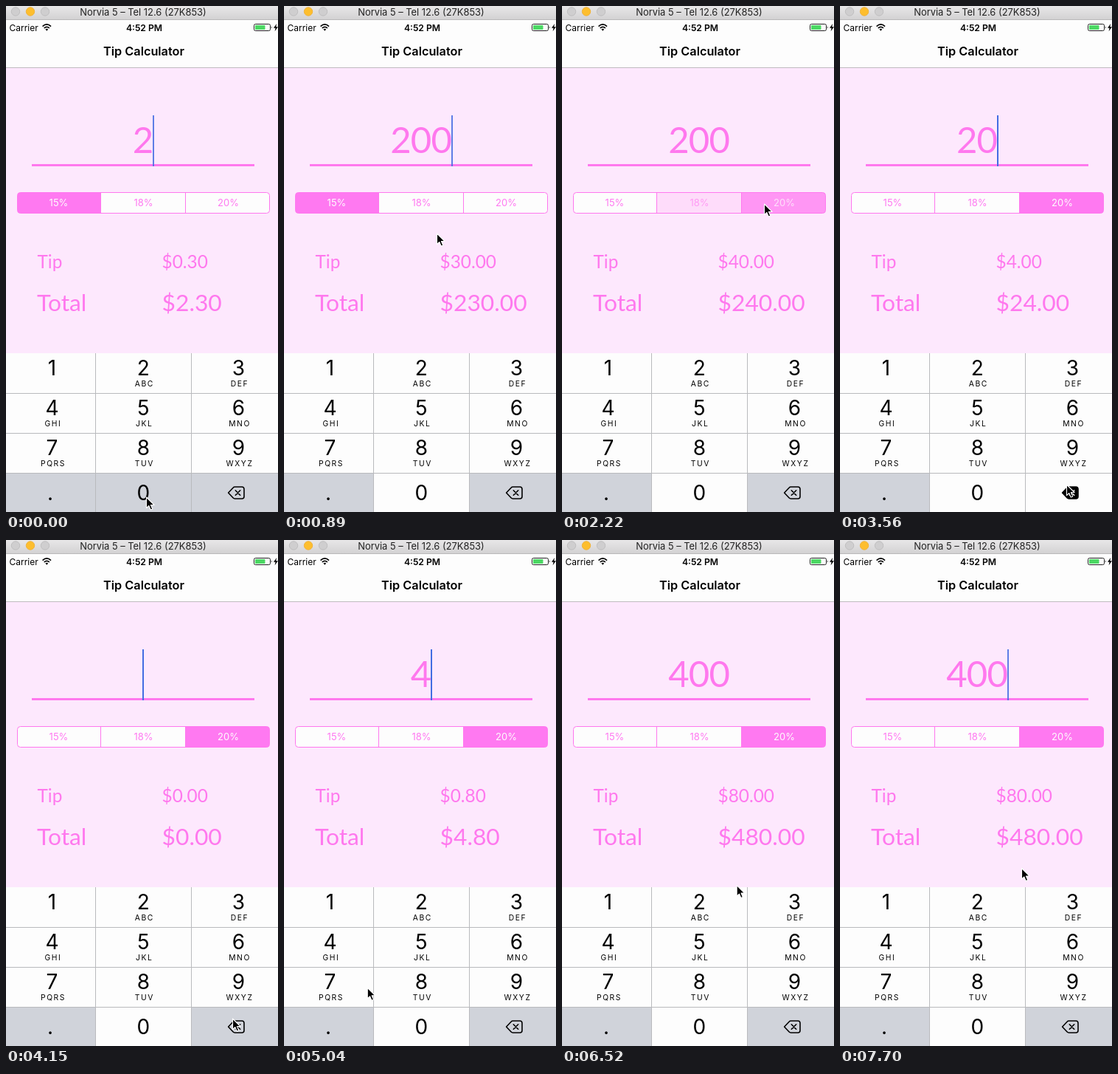
An HTML page that plays this animation: 369x685 px, repeating every 8 s.

```html
<!DOCTYPE html>
<html lang="en">
<head>
<meta charset="utf-8">
<title>Tip Calculator</title>
<style>
  html, body { margin: 0; width: 100%; height: 100%; overflow: hidden; background: #fde8fd; }
  svg { display: block; width: 100%; height: 100%; }
  text { font-family: Inter, Roboto, sans-serif; }
  .mid { text-anchor: middle; }
  .app text { font-family: Lato, "Open Sans", sans-serif; font-weight: 400; fill: #ff78ee; }
  .small { font-size: 24.4px; }
  .large { font-size: 31.8px; }
  .digit { font-size: 28px; }
  .letters { font-size: 10.3px; letter-spacing: 1.6px; }
</style>
</head>
<body>
<svg viewBox="0 0 369 685">
  <defs>
    <linearGradient id="bar" x2="0" y2="1">
      <stop stop-color="#e8e7e8"/><stop offset="1" stop-color="#d3d2d3"/>
    </linearGradient>
    <clipPath id="pill"><rect x="15.5" y="252.5" width="342" height="28" rx="4"/></clipPath>
  </defs>

  <rect width="369" height="685" fill="#fde8fd"/>
  <rect width="369" height="18" fill="url(#bar)"/>
  <rect y="18" width="369" height="1" fill="#b9b8b9"/>
  <g stroke-width="1">
    <circle cx="13" cy="7.5" r="5.7" fill="#cfcecf" stroke="#bfbebf"/>
    <circle cx="33" cy="7.5" r="5.7" fill="#fdbe2e" stroke="#f0b23a"/>
    <circle cx="53" cy="7.5" r="5.7" fill="#cfcecf" stroke="#bfbebf"/>
  </g>
  <text class="mid" x="186" y="13" font-size="12.9" fill="#222">Norvia 5 – Tel 12.6 (27K853)</text>

  <rect y="19" width="369" height="64" fill="#fdfdfd"/>
  <rect y="83" width="369" height="1" fill="#c0bbc0"/>
  <text x="4.5" y="34" font-size="12">Carrier</text>
  <g fill="none" stroke="#000" stroke-width="1.7">
    <path d="M49.6 27.6Q55.3 22.2 61 27.6M51.7 30Q55.3 26.6 58.9 30"/>
    <path d="M53.4 31.6Q55.3 30 57.2 31.6L55.3 33.8Z" fill="#000" stroke="none"/>
  </g>
  <text class="mid" x="187.5" y="34" font-size="12.2" font-weight="600">4:52 PM</text>
  <rect x="336.5" y="24.5" width="22" height="9" rx="2" fill="none" stroke="#222"/>
  <rect x="338" y="26" width="13.5" height="6" rx=".6" fill="#4cd964"/>
  <path d="M359.8 27.2Q361.6 29 359.8 30.8Z"/>
  <path d="M367.2 24L363 29.8H365.6L364.6 34.2L369 28.2H366.2Z"/>
  <text class="mid" x="187" y="67" font-size="16.3" font-weight="600">Tip Calculator</text>

  <g class="app">
    <text id="bill" class="mid" x="185.6" y="198.5" font-size="49" letter-spacing="-.8"></text>
    <rect x="35" y="214" width="302" height="3" fill="#ff78ee"/>
    <rect id="caret" y="148" width="2" height="69" fill="#426de2"/>
    <text class="small" x="42.5" y="355">Tip</text>
    <text class="small" id="tip" x="211.5" y="355"></text>
    <text class="large" x="42" y="412.5">Total</text>
    <text class="large" id="total" x="211.5" y="412.5"></text>
  </g>

  <g id="segments" clip-path="url(#pill)"></g>
  <rect x="15.5" y="252.5" width="342" height="28" rx="4" fill="none" stroke="#ff78ee"/>
  <path d="M128.5 252.5V280.5M243.5 252.5V280.5" stroke="#ff78ee"/>

  <g id="keys"></g>
  <path d="M0 524.5H369M0 578.5H369M0 632.5H369M121.5 470V685M251.5 470V685" stroke="#b9babd"/>
  <g id="labels"></g>
  <g stroke-width="1.6" stroke-linejoin="round" stroke-linecap="round">
    <path id="erase" d="M301.6 659L308 652.2Q309 651 310.6 651H320Q323 651 323 654V664Q323 667 320 667H310.6Q309 667 308 665.8Z" stroke="#000"/>
    <path id="cross" d="M311.3 655.8L317.7 662.2M317.7 655.8L311.3 662.2"/>
  </g>

  <path id="pointer" d="M0 0V14.6L3.3 11.5L5.7 17L8.2 15.9L5.9 10.5H10.6Z" fill="#000" stroke="#fff" stroke-width="1.1" stroke-linejoin="round"/>
</svg>

<script>
const LOOP = 8000, STEP = 148;
const PINK = [255, 121, 241], WHITE = [253, 253, 253];
const LIGHT = '#fdfdfd', GREY = '#d0d3da';
const RATES = [15, 18, 20];

// Each tap is held for one step and acts on release
const taps = [
  { at: 0, key: '0' }, { at: 2, key: '0' },
  { at: 9, rate: 18 }, { at: 14, rate: 20 },
  { at: 22, key: 'del' }, { at: 24, key: 'del' }, { at: 26, key: 'del' },
  { at: 32, key: '4' }, { at: 35, key: '0' }, { at: 37, key: '0' }
];
const moves = [
  { from: 3, to: 6, x: 207.5, y: 308 },
  { from: 6, to: 9, x: 190, y: 267 },
  { from: 11, to: 14, x: 274.5, y: 268 },
  { from: 20, to: 22, x: 307.5, y: 648 },
  { from: 28, to: 32, x: 70, y: 546 },
  { from: 33, to: 35, x: 156.5, y: 666.5 },
  { from: 40, to: 45, x: 246.5, y: 444.5 }
];

const $ = id => document.getElementById(id);
const add = (parent, tag, attrs, text = '') => {
  const el = document.createElementNS('http://www.w3.org/2000/svg', tag);
  for (const name in attrs) el.setAttribute(name, attrs[name]);
  el.textContent = text;
  return parent.appendChild(el);
};
const mix = (a, b, p) => `rgb(${a.map((v, i) => Math.round(v + (b[i] - v) * p))})`;
const money = value => '$' + value.toFixed(2);
const ease = p => p * p * (3 - 2 * p);

function stateAt(k) {
  const s = { bill: '2', rate: 15, old: 15, edited: 0, chosen: -1 };
  for (const { at, key, rate } of taps) {
    if (k === at) Object.assign(s, { key, hover: rate });
    if (k <= at) break;
    if (rate) Object.assign(s, { old: s.rate, rate, chosen: at + 1 });
    else {
      s.bill = key === 'del' ? s.bill.slice(0, -1) : s.bill + key;
      s.edited = at + 1;
    }
  }
  return s;
}

function pointerAt(k) {
  let x = 190.5, y = 665;
  for (const m of moves) {
    const p = ease(Math.min(1, Math.max(0, (k - m.from) / (m.to - m.from))));
    x += (m.x - x) * p;
    y += (m.y - y) * p;
  }
  return [x, y];
}

// Four steps on, three off, restarted by typing; softer at both ends
function caretAt(age) {
  const phase = age % 7;
  return phase > 3 ? 0 : phase % 3 ? 1 : .85;
}

function fillOf(rate, s, k) {
  const fading = k === s.chosen;
  if (rate === s.rate) return fading ? .78 : 1;
  return rate === s.hover || (fading && rate === s.old) ? .25 : 0;
}

const edges = [15, 128.5, 243.5, 358];
const segments = RATES.map((rate, i) => ({
  rate,
  box: add($('segments'), 'rect', { x: edges[i], y: 252, width: edges[i + 1] - edges[i], height: 29 }),
  label: add($('segments'), 'text', { class: 'mid', x: 71.5 + i * 115, y: 271.3, 'font-size': 13 }, rate + '%')
}));

const columns = [0, 121.5, 251.5, 369], centres = [62.5, 186.3, 315.5];
const letters = ['', 'ABC', 'DEF', 'GHI', 'JKL', 'MNO', 'PQRS', 'TUV', 'WXYZ'];
const keys = {};
[...'123456789.0', 'del'].forEach((name, i) => {
  const col = i % 3, top = 470 + Math.floor(i / 3) * 54, x = centres[col];
  const rest = name === '.' || name === 'del' ? GREY : LIGHT;
  keys[name] = {
    rest,
    box: add($('keys'), 'rect', { x: columns[col], y: top, width: columns[col + 1] - columns[col], height: 54 })
  };
  if (name !== 'del') {
    add($('labels'), 'text', { class: 'mid digit', x: name === '.' ? 60 : x, y: top + (i > 8 ? 37 : 30) }, name);
  }
  if (letters[i]) add($('labels'), 'text', { class: 'mid letters', x: x + 1.5, y: top + 45 }, letters[i]);
});

function draw(time) {
  const k = Math.floor((time + 8) / STEP);
  const s = stateAt(k), amount = Number(s.bill), tip = amount * s.rate / 100;
  $('bill').textContent = s.bill;
  $('tip').textContent = money(tip);
  $('total').textContent = money(amount + tip);
  $('caret').setAttribute('x', Math.round(185.4 + s.bill.length * 13.85));
  $('caret').setAttribute('opacity', caretAt(k - s.edited));

  for (const { rate, box, label } of segments) {
    const p = fillOf(rate, s, k);
    box.setAttribute('fill', mix(WHITE, PINK, p));
    label.setAttribute('fill', mix(PINK, WHITE, p));
  }

  for (const name in keys) {
    const { box, rest } = keys[name];
    const swapped = rest === GREY ? LIGHT : GREY;
    box.setAttribute('fill', name === s.key ? swapped : rest);
  }
  const erasing = s.key === 'del';
  $('erase').setAttribute('fill', erasing ? '#000' : 'none');
  $('cross').setAttribute('stroke', erasing ? '#fff' : '#000');

  $('pointer').setAttribute('transform', `translate(${pointerAt(k)})`);
}

const start = performance.now();
function tick(now) {
  draw(Math.max(0, now - start) % LOOP);
  requestAnimationFrame(tick);
}
draw(0);
requestAnimationFrame(tick);
</script>
</body>
</html>
```
